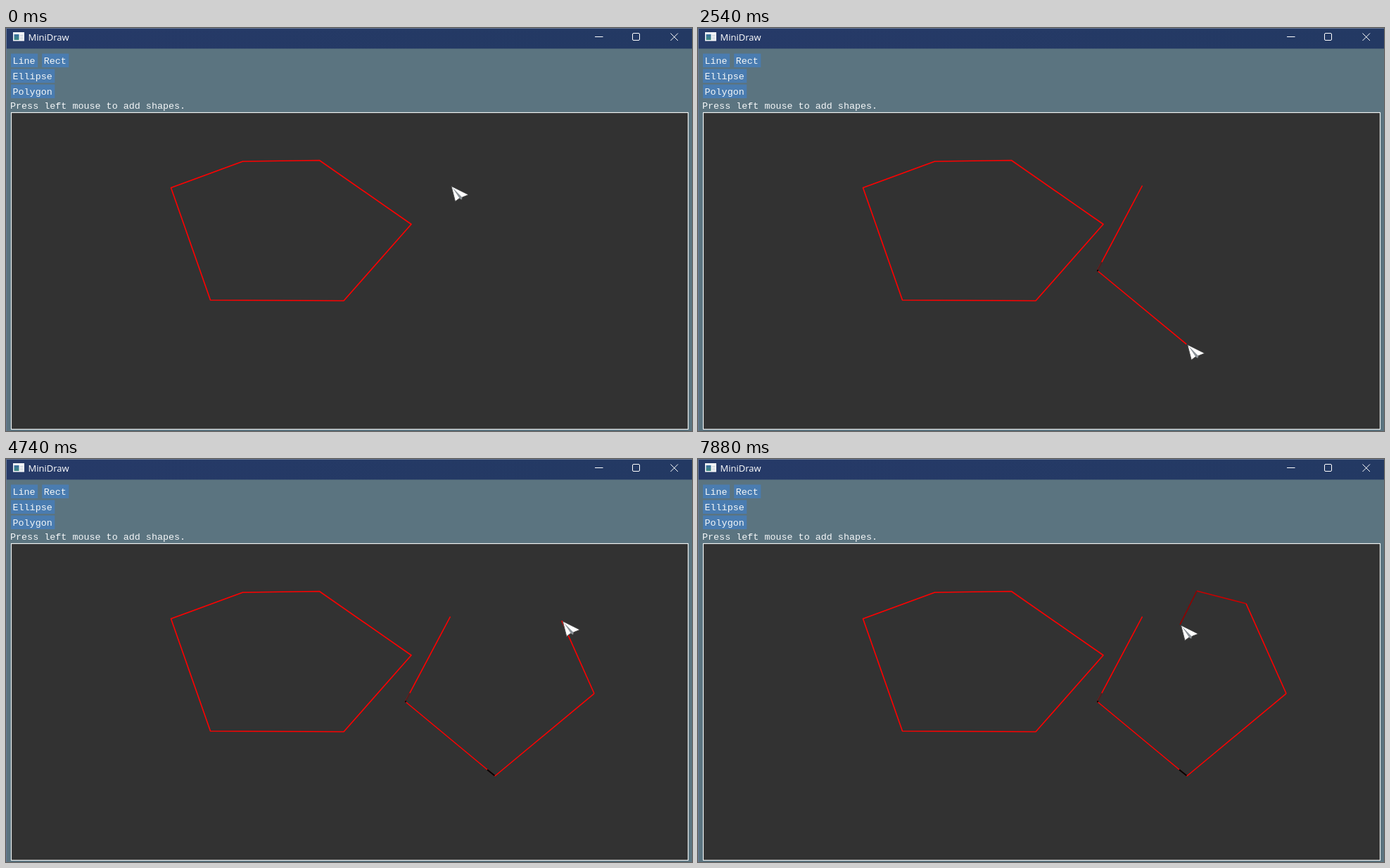
These frames come from a looping animation (975 by 574 pixels, 8000 ms). An HTML page:

```html
<!DOCTYPE html>
<html lang="en">
<head>
<meta charset="utf-8">
<title>MiniDraw</title>
<style>
  html, body { margin: 0; width: 100%; height: 100%; overflow: hidden; background: #5b7480; }
  svg { display: block; width: 975px; height: 574px; }
  text { fill: #fff; white-space: pre; }
  .title { font: 13px "Open Sans", "Noto Sans", sans-serif; }
  .ui { font: 13.4px "Liberation Mono", monospace; fill: #f4f7f8; }
  .btn { fill: #4a7cb0; }
  .icon { fill: none; stroke: #fff; }
  .ink { fill: none; stroke: #f00; stroke-width: 1.6; stroke-linejoin: round; }
</style>
</head>
<body>
<svg viewBox="0 0 975 574">
  <defs>
    <linearGradient id="bar"><stop stop-color="#263a68"/><stop offset="1" stop-color="#233963"/></linearGradient>
    <linearGradient id="pane" x2="0" y2="1"><stop stop-color="#3a6ea0"/><stop offset="1" stop-color="#3d8a80"/></linearGradient>
  </defs>
  <rect width="975" height="574" fill="#5b7480"/>
  <rect width="975" height="29.400" fill="url(#bar)"/>
  <path d="M.5 574V.5H975" fill="none" stroke="#6b7a96"/>

  <rect x="10" y="6" width="16" height="12.500" fill="#f4f6f8"/>
  <rect x="11.500" y="9" width="7" height="8" fill="url(#pane)"/>
  <path d="M20 10.500h4.500M20 13h4.500M20 15.500h4.500" stroke="#c3ccd6"/>
  <text class="title" x="31.500" y="17.500">MiniDraw</text>
  <path class="icon" d="M837 12.500h11.500M944.500 7.500l10.500 10.500m0-10.500l-10.500 10.500"/>
  <rect class="icon" x="890.500" y="7.500" width="10" height="10" rx="1.500"/>

  <g id="buttons"></g>
  <text class="ui" x="6" y="114.700">Press left mouse to add shapes.</text>

  <rect x="7.500" y="120.500" width="962" height="451" fill="#323232" stroke="#f2f4f4" stroke-width="1.150"/>
  <path class="ink" d="M234.500 227.500L336.500 190 445.500 188.500 576 279.500 480 388.500 290.500 387.500Z"/>
  <g id="lines"></g>
  <g id="smudge1">
    <path d="M574 333.500L568 345" stroke="#4a2020" stroke-width="2"/>
    <rect x="567" y="344.500" width="2" height="2"/>
  </g>
  <path id="smudge2" d="M684 442.500L694.500 451" stroke="#000" stroke-width="2"/>
  <circle id="press" r="13.500" fill="#fff000" fill-opacity=".5"/>
  <g id="cursor" stroke-linejoin="round">
    <path d="M0 0L24 12 15.500 15.500 14.500 19 11.500 17 5.500 21.500Z" fill="#fff" stroke="#4c4c4c"/>
    <path d="M1 1L11.500 17 14.500 18.500 15.200 15.500Z" fill="#8b9298"/>
    <path d="M1 1L15 15 23 12Z" fill="#fff"/>
  </g>
</svg>
<script>
const LOOP = 8000, STEP = 67;
const $ = id => document.getElementById(id);
const make = (tag, attrs, parent) => {
  const el = document.createElementNS("http://www.w3.org/2000/svg", tag);
  for (const name in attrs) el.setAttribute(name, attrs[name]);
  return parent.appendChild(el);
};
const show = (el, on) => el.setAttribute("visibility", on ? "visible" : "hidden");

["Line Rect", "Ellipse", "Polygon"].forEach((row, i) => {
  let x = 7;
  const y = 36.5 + 22 * i;
  for (const label of row.split(" ")) {
    const width = label.length * 8.04 + 6;
    make("rect", { class: "btn", x, y, width, height: 19.5 }, $("buttons"));
    make("text", { class: "ui", x: x + 2.5, y: y + 14.2 }, $("buttons")).textContent = label;
    x += width + 6;
  }
});

// each stop: where the pointer goes, when it leaves for it, when it clicks there
const stops = [
  { at: [631.5, 224.5], press: 200, hold: 200 },
  { at: [567.5, 345.5], go: 670, steps: 11, press: 1620 },
  { at: [695, 451.5], go: 2005, steps: 10, press: 2950, via: [648, 376], ease: 3 },
  { at: [836, 334], go: 3410, steps: 7, press: 4150, hold: 320 },
  { at: [779, 206], go: 4470, steps: 8, press: 5220 },
  { at: [709, 188], go: 5680, steps: 6, press: 6220 },
  { at: [685, 236], go: 7610, steps: 5 }
];
const mix = (a, b, k) => a.map((v, i) => v + (b[i] - v) * k);
const bend = (a, b, c, k) => mix(mix(a, b, k), mix(b, c, k), k);
const release = ({ press, hold = 260 }) => press + hold;

// the last edges are drawn in a fading red
const edges = stops.slice(1).map((stop, i) => ({
  ...stop,
  from: stops[i].at,
  line: make("line", { class: "ink", style: `stroke:rgb(${255 - 55 * Math.max(0, i - 3)},0,0)` }, $("lines"))
}));

function along({ from, at, via = mix(from, at, 0.5), steps, ease = 1.7 }, k) {
  return bend(from, via, at, 1 - (1 - k / steps) ** ease);
}

function draw(t) {
  let pos = stops[0].at;
  for (const edge of edges) {
    const started = t >= edge.go;
    show(edge.line, started);
    if (!started) continue;
    const k = Math.min(edge.steps, Math.floor((t - edge.go) / STEP) + 1);
    pos = along(edge, k);
    // the rubber band trails the pointer as it sets off
    const tip = mix(along(edge, k - 1), pos, 1 - 0.4 / k ** 2);
    const ends = { x1: edge.from[0], y1: edge.from[1], x2: tip[0], y2: tip[1] };
    for (const name in ends) edge.line.setAttribute(name, ends[name]);
  }
  show($("smudge1"), t >= release(stops[1]));
  show($("smudge2"), t >= release(stops[2]));

  const clicked = stops.find(stop => t >= stop.press && t < release(stop));
  show($("press"), clicked);
  if (clicked) $("press").setAttribute("transform", `translate(${clicked.at})`);
  $("cursor").setAttribute("transform", `translate(${pos[0] + 1.5} ${pos[1] + 1})`);
}

let origin;
function tick(now) {
  origin ??= now;
  draw((now - origin) % LOOP);
  requestAnimationFrame(tick);
}
draw(0);
requestAnimationFrame(tick);
</script>
</body>
</html>
```
